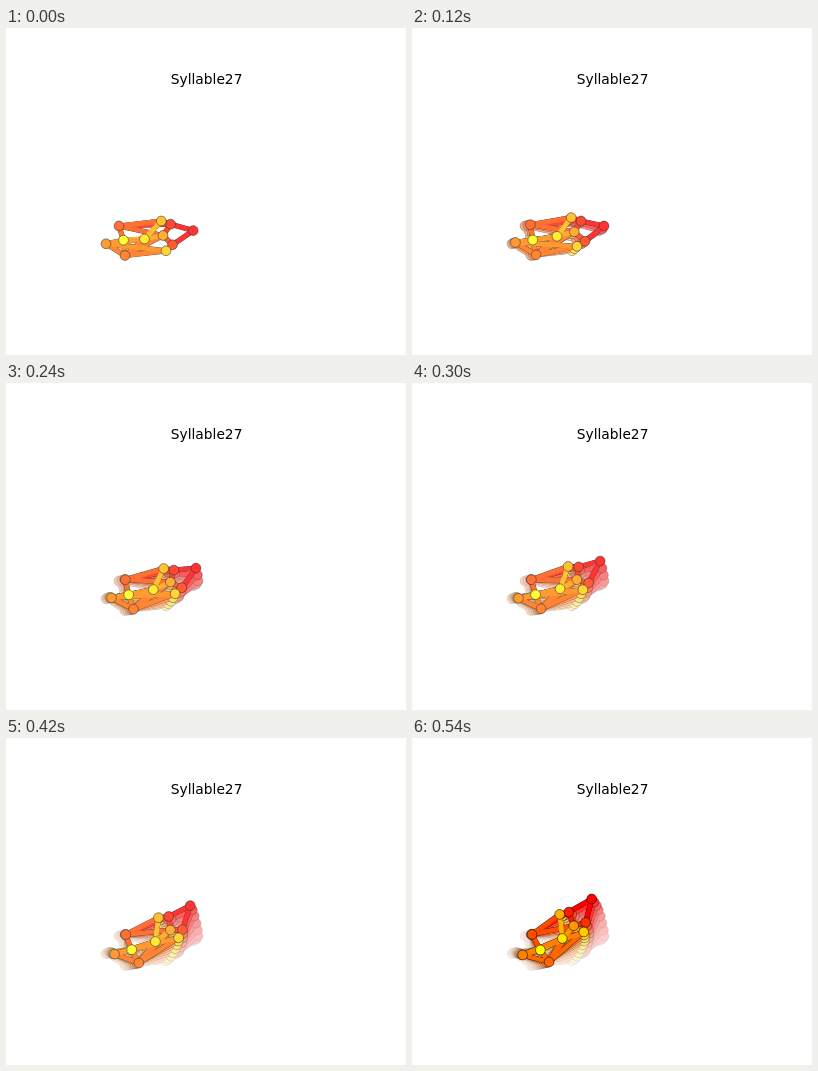
Recreate the animation shown at these times as an HTML page. Size 400 px wide and 327 px high, loop 600 ms.

```html
<!DOCTYPE html>
<html lang="en">
<head>
<meta charset="utf-8">
<title>Syllable27</title>
<style>
  html, body { margin: 0; width: 100%; height: 100%; overflow: hidden; background: #fff; }
  svg { display: block; width: 400px; height: 327px; }
  text { font: 13.8px "DejaVu Sans", sans-serif; text-anchor: middle; }
</style>
</head>
<body>
<svg id="stage" viewBox="0 0 400 327"></svg>
<script>
const NS = "http://www.w3.org/2000/svg";
const STEP_MS = 60;
const STEPS = 10;
const FADE = 0.2;

// Each joint follows a smooth curve through four places at these steps
const KEYS = [0, 2, 6, 9];
const paths = {
  nose:     [[187.2, 202.6], [192, 198], [186.3, 172], [179.7, 161]],
  leftEar:  [[164.7, 196.2], [169, 193], [165, 181], [156.8, 174.1]],
  rightEar: [[166.5, 216.8], [173, 213.3], [177, 195.5], [173.6, 184.5]],
  leftHip:  [[113, 198], [118.4, 196.7], [119.5, 196.7], [120, 196.4]],
  rightHip: [[119, 227.5], [124, 226.8], [130.8, 225.4], [137, 224]],
  tail:     [[100, 215.8], [103.4, 214.5], [107.5, 215.7], [110.7, 217]],
  neck:     [[157, 207.5], [162.3, 203.8], [165, 194.3], [161.7, 187.8]],
  leftArm:  [[155.3, 193], [159.2, 189.6], [154.5, 181.5], [147.7, 176.4]],
  rightArm: [[160, 222.8], [165, 218.3], [172.2, 203], [171.8, 194]],
  midBack:  [[138.5, 211], [145, 208.3], [148.8, 204.8], [150.3, 200.5]],
  lowBack:  [[117.5, 212.2], [120.8, 212], [124.5, 211.6], [128.4, 212]]
};
const names = Object.keys(paths);

// Bones by joint, in drawing order
const links = {
  midBack: "lowBack",
  nose: "leftEar rightEar",
  leftEar: "leftHip neck leftArm",
  rightEar: "neck rightArm",
  leftHip: "neck leftArm lowBack",
  rightHip: "tail neck rightArm midBack lowBack",
  tail: "rightArm midBack lowBack",
  neck: "midBack",
  leftArm: "midBack"
};
const bones = Object.entries(links).flatMap(([from, list]) =>
  list.split(" ").map(to => [names.indexOf(from), names.indexOf(to)]));

function sample(v, t) {
  const last = KEYS.length - 1;
  let i = 0;
  while (i < last - 1 && t >= KEYS[i + 1]) i++;
  const slope = k => {
    const a = Math.max(k - 1, 0), b = Math.min(k + 1, last);
    return (v[b] - v[a]) / (KEYS[b] - KEYS[a]);
  };
  const h = KEYS[i + 1] - KEYS[i];
  const u = (t - KEYS[i]) / h, w = 1 - u;
  return w * w * (1 + 2 * u) * v[i] + u * u * (3 - 2 * u) * v[i + 1]
    + h * u * w * (w * slope(i) - u * slope(i + 1));
}

function add(parent, tag, attrs) {
  const el = document.createElementNS(NS, tag);
  for (const name in attrs) el.setAttribute(name, attrs[name]);
  return parent.appendChild(el);
}

const color = i => `rgb(255,${Math.round(255 * i / (names.length - 1))},0)`;

function drawPose(svg, step) {
  const g = add(svg, "g", {});
  const pts = names.map(n => [0, 1].map(axis => sample(paths[n].map(p => p[axis]), step)));
  const line = (a, b, stroke, width) => add(g, "line", {
    x1: pts[a][0], y1: pts[a][1], x2: pts[b][0], y2: pts[b][1],
    stroke, "stroke-width": width
  });
  bones.forEach(([a, b]) => line(a, b, "#000", 5.2));
  bones.forEach(([a, b]) => line(a, b, color(a), 4.8));
  pts.forEach(([cx, cy], i) => add(g, "circle", {
    cx, cy, r: 4.9, fill: color(i), stroke: "#000", "stroke-width": 0.56
  }));
  // A white veil fades this pose and all earlier ones
  if (step < STEPS - 1) {
    add(g, "rect", { width: 400, height: 327, fill: "#fff", "fill-opacity": FADE });
  }
  return g;
}

const stage = document.getElementById("stage");
const poses = Array.from({ length: STEPS }, (_, i) => drawPose(stage, i));
add(stage, "text", { x: 200.6, y: 56 }).textContent = "Syllable27";

function render(ms) {
  const step = Math.floor(ms / STEP_MS) % STEPS;
  poses.forEach((g, i) => { g.style.display = i <= step ? "" : "none"; });
}

const start = performance.now();
function tick() {
  render(performance.now() - start);
  requestAnimationFrame(tick);
}
tick();
</script>
</body>
</html>
```
